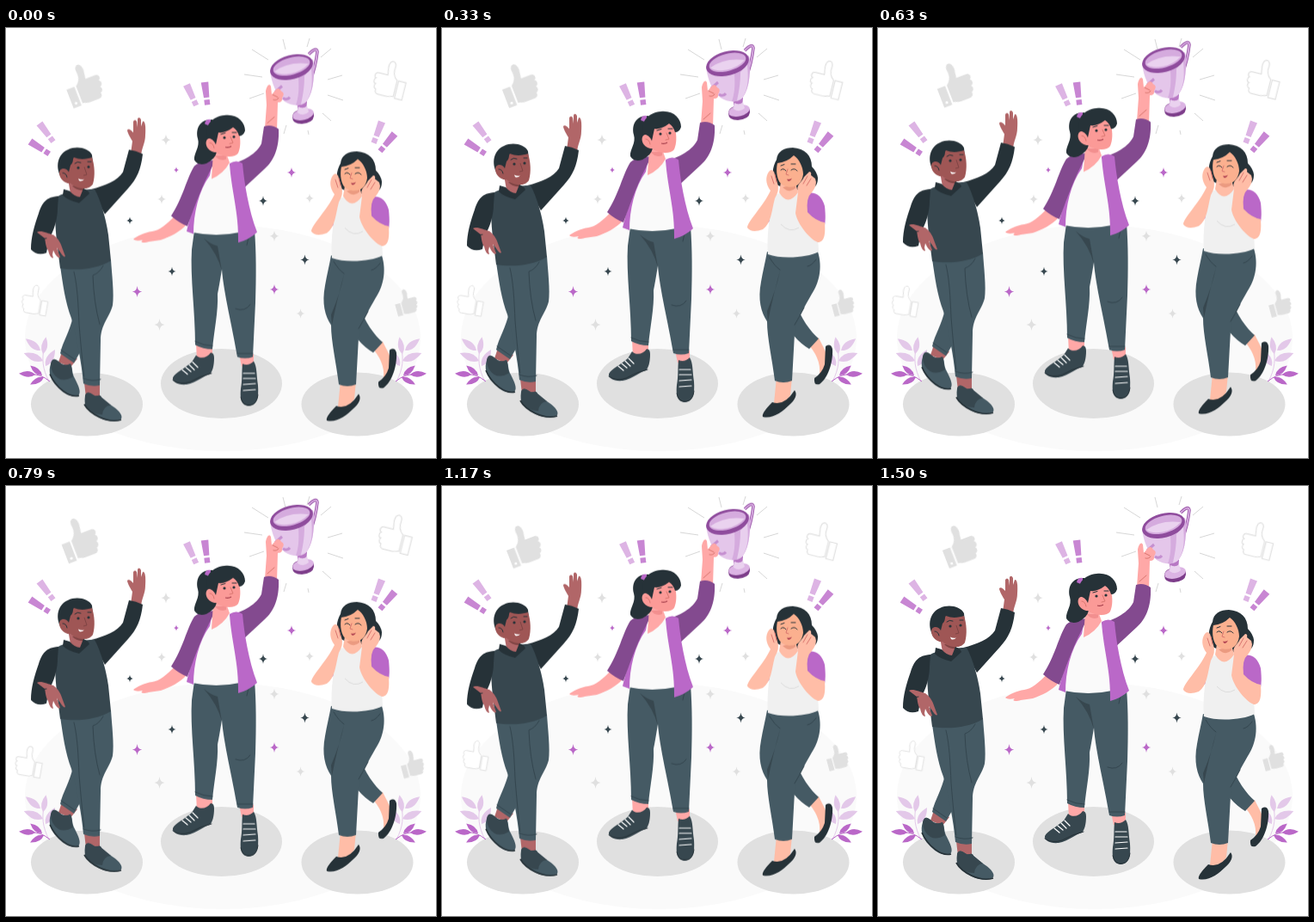
An HTML page without scripts for the animation above (1540 ms loop, 500x500 px).

```html
<!DOCTYPE html>
<html lang="en">
<head>
<meta charset="utf-8">
<title>Celebration</title>
<style>
html, body { margin: 0; width: 100%; height: 100%; overflow: hidden; background: #fff; }
svg { display: block; width: 100%; height: 100%; }

.float, .beat { animation: 1540ms linear -40ms infinite; }
.float { animation-name: float; }
.beat { animation-name: beat; transform-origin: 248px 189.5px; }
@keyframes float { 50% { transform: translateY(-10px); } }
@keyframes beat {
  0%, 30%, 40%, 60%, 100% { transform: scale(1); }
  10%, 50% { transform: scale(1.1); }
}

.dark { fill: #263238; }
.slate { fill: #37474f; }
.pants { fill: #455a64; }
.purple { fill: #ba68c8; }
.plum { fill: #834a8f; }
.lilac { fill: #ddb4e4; }
.pale { fill: #e3c8e9; }
.orchid { fill: #c886d3; }
.grey { fill: #e0e0e0; }
.outline { fill: #fff; stroke: #e0e0e0; stroke-width: 1.3; }
.white { fill: #fafafa; }
.brown { fill: #b16668; }
.umber { fill: #9f5655; }
.pink { fill: #ffa8a7; }
.rose { fill: #fb9a97; }
.peach { fill: #ffbda7; }
.apricot { fill: #fbb08f; }
.line { fill: none; stroke: #263238; stroke-width: 1; stroke-linecap: round; }
.fold { fill: none; stroke: #34464f; stroke-width: 1; stroke-linecap: round; }
.lace { fill: none; stroke: #fff; stroke-width: 1.2; stroke-linecap: round; }
.crease { fill: none; stroke: #d9766f; stroke-width: 1; stroke-linecap: round; }
</style>
</head>
<body>
<svg viewBox="0 0 500 500">
<defs>
  <path id="star" d="M0-1.1Q.1-.1 .95 0Q.1.1 0 1.1Q-.1.1-.95 0Q-.1-.1 0-1.1Z"/>
  <path id="bang" d="M-4.3 0H4.3L3.2 18H-3.2ZM-3.2 20.500H3.2V26.500H-3.2Z"/>
  <path id="leaf" d="M0 0Q8-7 20 0Q8 7 0 0Z"/>
  <path id="thumb" d="M0 0H9.5V22.5H0ZM11.5 0C17-4 18.500-9 17.500-16C17-24 26-25 26-14L24.500-4H36C41-4 41 2 38 3C41 5 40 10 37 10C39 13 38 16 35 17C36 20 34 22.5 31 22.5H20C16 22.5 14 20.5 11.5 20.5Z"/>
  <g id="plant">
    <g class="pale">
      <path d="M50 411C42 396 42 384 44 374" fill="none" stroke="#e3c8e9"/>
      <use href="#leaf" transform="translate(43 379) rotate(-80)"/>
      <use href="#leaf" transform="translate(40 375) rotate(-141) scale(1.1)"/>
      <use href="#leaf" transform="translate(43 387) rotate(-158) scale(1.2)"/>
      <use href="#leaf" transform="translate(46 393) rotate(-60) scale(1.1)"/>
    </g>
    <g class="purple">
      <path d="M51 411Q40 402 30 403" fill="none" stroke="#ba68c8"/>
      <use href="#leaf" transform="translate(34 403) rotate(-176) scale(.95)"/>
      <use href="#leaf" transform="translate(42 404) rotate(-140) scale(.9)"/>
      <use href="#leaf" transform="translate(44 406) rotate(152) scale(.9)"/>
    </g>
  </g>
</defs>

<ellipse cx="252" cy="360.500" rx="230" ry="131.500" fill="#fafafa"/>
<g class="grey">
  <ellipse cx="94" cy="437.500" rx="65" ry="37"/>
  <ellipse cx="250.500" cy="413.500" rx="70.500" ry="40.500"/>
  <ellipse cx="408.500" cy="437.500" rx="65" ry="37"/>
</g>

<use href="#plant"/>
<use href="#plant" transform="translate(504) scale(-1 1)"/>

<g class="beat">
  <g transform="translate(75 75) rotate(-21)">
    <use href="#thumb" class="grey"/>
    <circle cx="4.700" cy="18" r="1.500" fill="#fff"/>
  </g>
  <use href="#thumb" class="outline" transform="translate(459.500 67) rotate(14) scale(-.9 .9)"/>
  <use href="#thumb" class="outline" transform="translate(54 315) rotate(10) scale(-.73 .73)"/>
  <use href="#thumb" class="grey" transform="translate(447 318) rotate(-15) scale(.63)"/>
</g>

<g class="lilac">
  <use href="#bang" transform="translate(39 111) rotate(-37)"/>
  <use href="#bang" transform="translate(210 66) rotate(-25)"/>
  <use href="#bang" transform="translate(437 109) rotate(21)"/>
</g>
<g class="orchid">
  <use href="#bang" transform="translate(28 132) rotate(-57)"/>
  <use href="#bang" transform="translate(231 63) rotate(-7)"/>
  <use href="#bang" transform="translate(452 123) rotate(40)"/>
</g>

<g class="purple">
  <use href="#star" transform="translate(198 165) scale(3.500)"/>
  <use href="#star" transform="translate(332 168) scale(5.500)"/>
  <use href="#star" transform="translate(152.500 306.500) scale(6)"/>
  <use href="#star" transform="translate(312 304) scale(5.500)"/>
</g>
<g class="slate">
  <use href="#star" transform="translate(144 224) scale(4)"/>
  <use href="#star" transform="translate(299 201) scale(5.300)"/>
  <use href="#star" transform="translate(193 283) scale(4.800)"/>
  <use href="#star" transform="translate(347.500 269.500) scale(5.500)"/>
</g>
<g class="grey">
  <use href="#star" transform="translate(186 130) scale(6)"/>
  <use href="#star" transform="translate(181 199) scale(5.300)"/>
  <use href="#star" transform="translate(353 198) scale(5.300)"/>
  <use href="#star" transform="translate(312 242) scale(5.800)"/>
  <use href="#star" transform="translate(178.500 345) scale(6.300)"/>
  <use href="#star" transform="translate(342.500 332) scale(5.300)"/>
</g>
<path d="M322 13L325 25M353 12L350 22M378 24L366 34M391 55L374 60M392 84L374 78M378 108L368 99M352 124L351 119M323 123L326 113M283 82L300 76M277 54L298 57M286 25L305 37" stroke="#ccc" stroke-width=".8"/>

<!-- Man -->
<g class="float">
  <path class="brown" d="M66 374L83 385L75 395L61 389ZM91 413H109V430H93Z"/>
  <path class="pants" d="M78 335C75 352 66 365 63 379L79 390L95 362Z"/>
  <path class="fold" d="M64 375L80 386"/>
  <path class="pants" d="M63 277L122 270C123 286 126 310 124 323C120 338 110 345 110 364L109 416Q99 418 90 414C88 390 82 360 76 338C69 320 66 298 63 277Z"/>
  <path class="fold" d="M79 284C83 300 84 322 85 345C87 370 89 390 91 406M90 408Q100 412 110 409M113 277Q108 286 101 288Q102 320 109 345"/>
  <path class="pants" d="M52 391C54 383 58 386 62 389C66 393 70 393 75 391C78 396 76 401 80 408C84 416 88 424 84 428C76 431 66 425 60 418C51 409 49 400 52 391Z"/>
  <path class="slate" d="M52 391C54 383 58 386 62 389C66 393 70 393 75 391C77 396 76 401 78 406Q68 412 61 408Q52 402 52 391Z"/>
  <path class="pants" d="M92 428C94 422 98 425 103 428C107 429 109 426 111 430C116 434 119 437 125 441C132 446 136 451 134 455C126 460 112 457 104 451C94 445 90 440 92 428Z"/>
  <path class="slate" d="M92 428C94 422 98 425 103 428C107 429 109 426 111 430L122 439Q113 440 112 450Q98 450 92 438Z"/>
  <path d="M51 403C58 419 74 431 85 428M91 438C97 449 118 461 134 456" fill="none" stroke="#263238" stroke-width="1.700"/>

  <path class="brown" d="M145 147L147 132C144 127 141 122 141 119C143 117 146 120 148 122L148 109Q150 106 152 109L153 116V106Q155 103 157 107L157 115L159 109Q163 108 162 125C162 134 158 139 157 149Z"/>
  <path class="dark" d="M99 188C115 184 130 178 136 168L143 142Q151 143 159 147C157 165 152 176 142 187L115 217Z"/>
  <path class="slate" d="M59 197C70 190 90 188 103 188C110 200 117 225 119 241L122 271C106 281 82 283 63 280C61 260 54 225 59 197Z"/>
  <path class="dark" d="M61 196C46 197 42 204 38 216C33 230 29 244 29 258Q36 266 47 262L50 246C56 236 60 222 60 210Z"/>
  <path class="brown" d="M36 238C40 235 48 239 55 241C62 246 64 252 66 258L69 266Q67 268 63 261L59 256L63 267Q60 270 55 259L54 264L55 268Q51 268 49 259C46 255 46 249 45 245Z"/>
  <path d="M36 251Q41 245 47 245" class="line" stroke="#000"/>
  <path class="brown" d="M72 176L75 193Q84 202 90 194L91 183Z"/>
  <path d="M77 184Q82 190 91 189L91 185Z" fill="#7f4444"/>
  <path class="dark" d="M67 188L74 190Q80 197 86 197L90 187Q96 189 97 193L85 204Q72 201 66 195Z"/>
  <path class="dark" d="M64 174C57 162 60 147 72 142C82 137 96 140 100 148L101 159L72 181Z"/>
  <path class="umber" d="M75 160C79 157 77 153 79 151C86 154 94 153 100 151C103 160 104 172 101 182C96 190 82 188 75 181C70 182 62 177 62 169C62 163 70 162 73 168Z"/>
  <path class="line" d="M80 158Q83 155 87 157M95 156L99 156M66 169Q70 169 71 174" stroke-width="1.300"/>
  <path d="M91 162L94 171L90 172" fill="none" stroke="#7f4444"/>
  <path d="M84 175.500Q87 177.500 91 176.500Q88 179.500 85 178Z" fill="#fff"/>
  <circle class="dark" cx="84" cy="163" r="1.600"/><circle class="dark" cx="96" cy="162" r="1.600"/>
</g>

<!-- Woman with the cup -->
<g class="float">
  <path class="pink" d="M221 367H240V387H222ZM271 380H288V394H274Z"/>
  <path class="pants" d="M219 236H289C291 260 291 290 290 320L287 383Q278 386 269 383C263 347 253 308 251 281C249 294 247 305 246 310C247 330 242 352 240 374Q229 374 220 369C220 330 214 290 216 258Z"/>
  <path class="fold" d="M282 244L280 253M267 327Q278 331 284 322M220 365Q230 370 240 370M269 379H287"/>
  <path d="M230 245Q238 252 246 254L251 283Q246 263 230 245Z" class="slate"/>
  <path class="slate" d="M194 407C197 401 207 397 216 389L221 381C226 386 234 384 238 378Q242 378 242 384C242 394 240 400 237 403C229 405 222 413 210 415C200 416 193 412 194 407Z"/>
  <path class="slate" d="M275 391Q282 394 288 388C292 394 291 404 293 416C294 430 292 439 283 440C273 440 272 431 273 420C275 410 274 400 275 391Z"/>
  <path d="M194 410Q202 416 214 412Q226 405 239 402M273 430Q275 440 284 439Q292 438 293 427" class="line" stroke-width="1.700"/>
  <path class="lace" d="M205 398L211 403M209 395L215 400M213 392L219 398M217 389L223 395M276 402H289M276 408H290M276 415L290 414M276 422L290 421"/>

  <path class="pink" d="M197 218C187 229 178 236 170 237C161 238 152 243 148 246C150 248 154 248 159 247C155 250 160 251 166 249L180 247C191 243 202 238 210 229Z"/>
  <path class="white" d="M236 162L259 156C265 170 271 205 272 238Q245 244 216 238C216 210 222 180 236 162Z"/>
  <path class="purple" d="M240 156C228 172 218 205 210 237L218 240C218 216 224 190 237 172Z"/>
  <path class="plum" d="M244 154C234 155 226 155 219 161C210 175 206 198 192 219Q201 227 211 231C218 212 228 182 244 154Z"/>
  <path class="pink" d="M241 145L239 176Q253 170 260 157L256 146Z"/>
  <path d="M243 149Q248 156 256 153V149Z" fill="#f28f8f"/>

  <!-- Cup -->
  <path d="M352 31Q361 22 362 28Q360 46 354 61" fill="none" stroke="#9a55a8" stroke-width="3.500"/>
  <path d="M352 31Q361 22 362 28Q360 46 354 61" fill="none" stroke="#d9aee2" stroke-width="1.800"/>
  <path d="M338 86H350L349 98H340Z" fill="#b878c4"/>
  <path d="M333 104Q333 98 340 96Q347 91 351 95Q359 97 358 103Q357 111 344 112Q333 112 333 104Z" fill="#7d3d8a"/>
  <ellipse cx="345.500" cy="101" rx="12.500" ry="6.500" transform="rotate(-14 345.500 101)" fill="#dcb4e4"/>
  <path d="M340 92Q346 95 350 91L352 98Q346 104 339 99Z" fill="#ead2ef"/>
  <path d="M307 50C309 66 314 77 324 86C332 91 344 93 350 85C358 74 359 54 357 37Z" fill="#e4c6ea"/>
  <path d="M340 58C341 72 340 82 337 90Q346 91 350 85C358 74 359 54 357 37Z" fill="#d5abde"/>
  <path d="M347 56C347 70 345 80 343 89Q348 88 350 85C357 73 356 60 355 47Z" fill="#e8cfee"/>
  <ellipse cx="332" cy="46" rx="25.500" ry="14" transform="rotate(-15 332 46)" fill="#8f4c9d"/>
  <ellipse cx="332" cy="44.800" rx="22" ry="10" transform="rotate(-15 332 44.800)" fill="#d5abde"/>
  <path d="M312 51Q328 39 352 42Q344 51 331 53.500Q319 56 312 51Z" fill="#ead2ef"/>
  <path d="M313 75L321 68M322 82Q327 85 330 81" fill="none" stroke="#c58fd0" stroke-width="3"/>

  <path class="pink" d="M301 117L303 90L302 74C303 68 306 64 308 68L309 78L314 72Q318 69 320 74Q325 76 321 82Q322 87 316 87L315 120Z"/>
  <path class="crease" d="M310 78L316 81M311 84Q315 85 317 82M304 111L312 104"/>
  <path class="plum" d="M260 159C276 156 292 146 297 135L300 115Q309 112 317 118C318 141 311 155 301 164L273 190Z"/>
  <path class="purple" d="M260 158Q268 153 275 158C277 180 282 212 292 238Q282 247 270 250C271 215 262 190 260 158Z"/>

  <path class="dark" d="M240 107C226 106 220 117 223 129C226 139 218 146 219 154Q223 161 233 158Q243 153 245 145L246 117Z"/>
  <path d="M231 112Q232 106 238 107L238 115Z" class="purple"/>
  <path class="rose" d="M243 124V112H266L271 122C273 130 273 139 270 146C266 152 252 151 244 145C235 145 230 135 234 130Q238 126 243 132Z"/>
  <path class="dark" d="M234 128C230 113 241 103 254 102C269 100 278 110 278 120Q276 126 271 126Q269 119 264 116Q255 123 247 122L244 136Q241 129 234 128Z"/>
  <path class="line" d="M250 124L255 122.500M263 122L268 122" stroke-width="1.300"/>
  <circle class="dark" cx="254" cy="128" r="1.600"/><circle class="dark" cx="265" cy="127" r="1.600"/>
  <path class="crease" d="M261 127L264 134L260 135M237 134Q241 134 242 140"/>
  <path d="M255 139Q259 140 262 138" fill="none" stroke="#a53f4c" stroke-width="1.200"/>
</g>

<!-- Woman on the right -->
<g class="float">
  <path class="peach" d="M389 411H407L405 432Q396 446 386 441ZM427 374L438 365C445 380 449 383 448 395L438 412Q443 393 427 374Z"/>
  <path class="dark" d="M446 375Q452 371 454 378C455 393 449 412 439 419Q432 421 433 412Q442 406 445 396Z"/>
  <path class="dark" d="M410 426C414 431 410 438 404 443C396 451 384 460 373 457Q371 453 384 440Q398 445 410 426Z"/>
  <path class="pants" d="M409 320C418 344 428 357 438 366L427 378C415 371 402 358 398 338Z"/>
  <path class="pants" d="M378 265H437C443 284 438 302 430 314C421 330 411 346 410 360L407 415Q397 419 387 415C384 390 378 365 378 346C371 335 367 321 371 300C373 288 376 276 378 265Z"/>
  <path class="fold" d="M381 272Q387 282 393 286M435 274Q430 281 425 282M410 350Q416 340 421 330"/>
  <path d="M393 287Q389 308 378 334L379 346Q384 320 393 287Z" class="slate"/>

  <path class="dark" d="M388 186C383 178 384 166 389 158C390 148 398 144 408 144C422 145 430 153 430 166Q436 172 437 179Q437 192 427 191C414 196 396 192 388 186Z"/>
  <path class="purple" d="M385 212L376 232L384 229Z"/>
  <path fill="#f0f0f0" d="M384 200L395 196H411L426 196C428 215 438 240 438 265C425 272 395 274 379 268C377 245 382 220 384 200Z"/>
  <path class="peach" d="M394 184L392 196Q402 213 414 196L411 185Z"/>
  <path d="M396 190Q404 198 411 191V187Z" fill="#eb9a80"/>
  <path d="M394 233Q404 244 415 237" fill="none" stroke="#ddd"/>
  <path class="apricot" d="M390 162Q401 161 409 153C415 157 420 166 420 175C418 190 406 192 397 188C389 184 388 170 390 162Z"/>
  <path class="line" d="M394 170Q397 167 400 171M406 170Q410 167 413 171M394 165L398 163.500M406 163L411 163"/>
  <path class="crease" d="M402 169L400 175L403 176"/>
  <path d="M401 180.500Q404 181.500 407 179.500Q405 184 402 182.500Z" fill="#b24553"/>

  <path class="peach" d="M382 194C376 186 376 178 380 172Q383 168 386 172L390 185Q393 193 387 203C383 218 383 232 373 239Q360 244 355 237C355 230 373 213 382 194Z"/>
  <path class="purple" d="M425 197C435 195 442 201 445 212C446 222 446 228 445 234Q432 232 423 221Z"/>
  <path class="peach" d="M414 196C411 187 418 185 421 178L427 172Q430 172 429 176L434 180Q437 187 430 196Q423 202 425 219Q434 229 445 231C446 244 445 254 437 254C427 250 413 232 411 220Z"/>
  <path class="crease" d="M383 177L386 186M387 175L389 184M425 177L420 186M429 180L424 188"/>
</g>
</svg>
</body>
</html>
```
